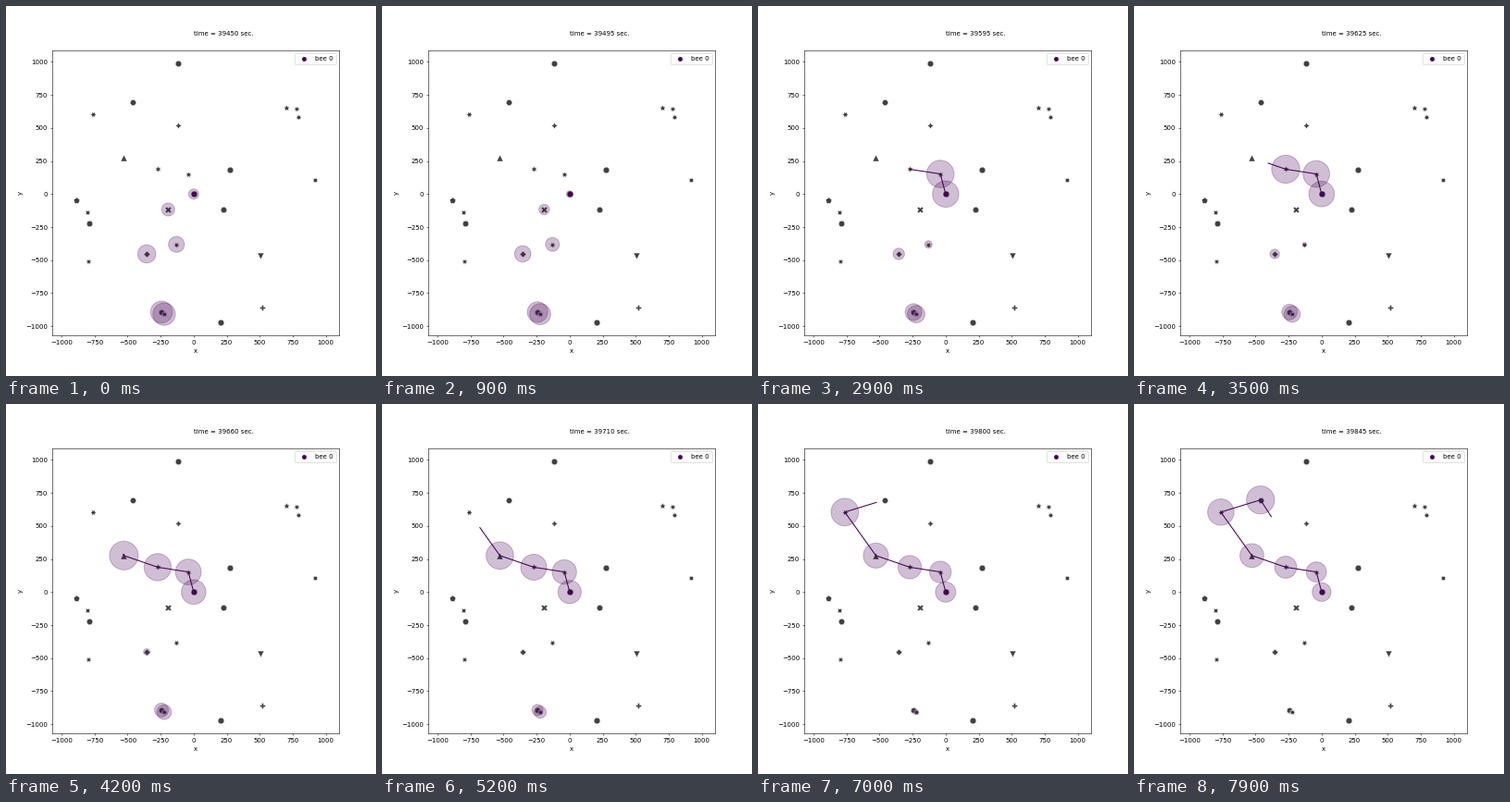
Recreate the animation shown at these times as a matplotlib script. Size 400x400 px, loop 8000 ms.

```python
import numpy as np
import matplotlib.pyplot as plt
from matplotlib.animation import FuncAnimation

FRAMES, STEP, START = 80, 5, 39450    # seconds of simulated time per frame
SPEED, MEMORY, MAX_AREA = 5, 600, 2000
PURPLE = "#440154"


def poly(n, angle=0):
    return (n, 0, angle)


def star(n, angle=0):
    return (n, 1, angle)


FLOWERS = [
    (0, 0, "o"), (-193, -117, "X"), (917, 107, poly(4, 45)),
    (522, -860, "P"), (-355, -453, poly(4)), (-115, 520, star(4)),
    (-528, 276, "^"), (-802, -135, star(4, 45)), (504, -468, "v"),
    (-763, 605, star(6, 30)), (-463, 697, poly(6, 30)),
    (703, 650, star(5)), (-886, -47, poly(5)),
    (-130, -381, star(7, 180 / 7)), (222, -115, poly(7, 180 / 7)),
    (-272, 188, star(6)), (-243, -893, poly(6)),
    (-795, -508, star(8, 22.5)), (-115, 990, poly(8, 22.5)),
    (-40, 152, star(7)), (-788, -225, poly(7)),
    (775, 645, star(9, 20)), (272, 185, poly(9, 20)),
    (795, 585, star(8)), (207, -970, poly(8)),
    (-223, -909, star(10, 18)),
]

# (x, y, time of leaving)
OLD_TRIP = [(0, 0, -525), (-193, -117, -477), (-130, -381, -415),
            (-355, -453, -360), (-243, -893, -250), (-223, -909, -234)]
TRIP = [(0, 0, 50), (-40, 152, 90), (-272, 188, 147), (-528, 276, 208),
        (-763, 605, 300), (-463, 697, 365), (-115, 160, 9999)]


def trail(t):
    """Path flown since leaving the hive, ending at the bee."""
    pts = [TRIP[0][:2]]
    for (x0, y0, leave), (x1, y1, _) in zip(TRIP, TRIP[1:]):
        if t <= leave:
            break
        d = np.array([x1 - x0, y1 - y0])
        k = min(1, SPEED * (t - leave) / np.hypot(*d))
        pts.append((x0 + k * d[0], y0 + k * d[1]))
    return np.array(pts)


def memories(t):
    """Positions and areas of the remembered places."""
    visits = OLD_TRIP + TRIP
    if t >= TRIP[0][2]:
        visits = visits[1:]
    live = [(x, y, MAX_AREA * (1 - (t - v) / MEMORY))
            for x, y, v in visits if 0 <= t - v < MEMORY]
    live = np.array(live)
    return live[:, :2], live[:, 2]


fig, ax = plt.subplots(figsize=(8, 8), dpi=50)
ax.set(xlim=(-1070, 1100), ylim=(-1069, 1087), xlabel="x", ylabel="y")

for x, y, marker in FLOWERS:
    ax.scatter(x, y, s=100, marker=marker, color="black", alpha=0.75,
               edgecolor="white", linewidth=0.8)
ax.scatter(0, 0, color=PURPLE, s=36, label="bee 0")
spots = ax.scatter([], [], color=PURPLE, alpha=0.25, linewidth=1.5)
line, = ax.plot([], [], color=PURPLE, lw=1.5)
clock = ax.text(0, 1200, "")
ax.legend(loc="upper right")


def draw(i):
    t = i * STEP
    places, areas = memories(t)
    spots.set_offsets(places)
    spots.set_sizes(areas)
    line.set_data(*trail(t).T)
    clock.set_text(f"time = {START + t} sec.")
    return spots, line, clock


anim = FuncAnimation(fig, draw, frames=FRAMES, interval=100, repeat=True,
                     repeat_delay=0)
plt.show()
```
